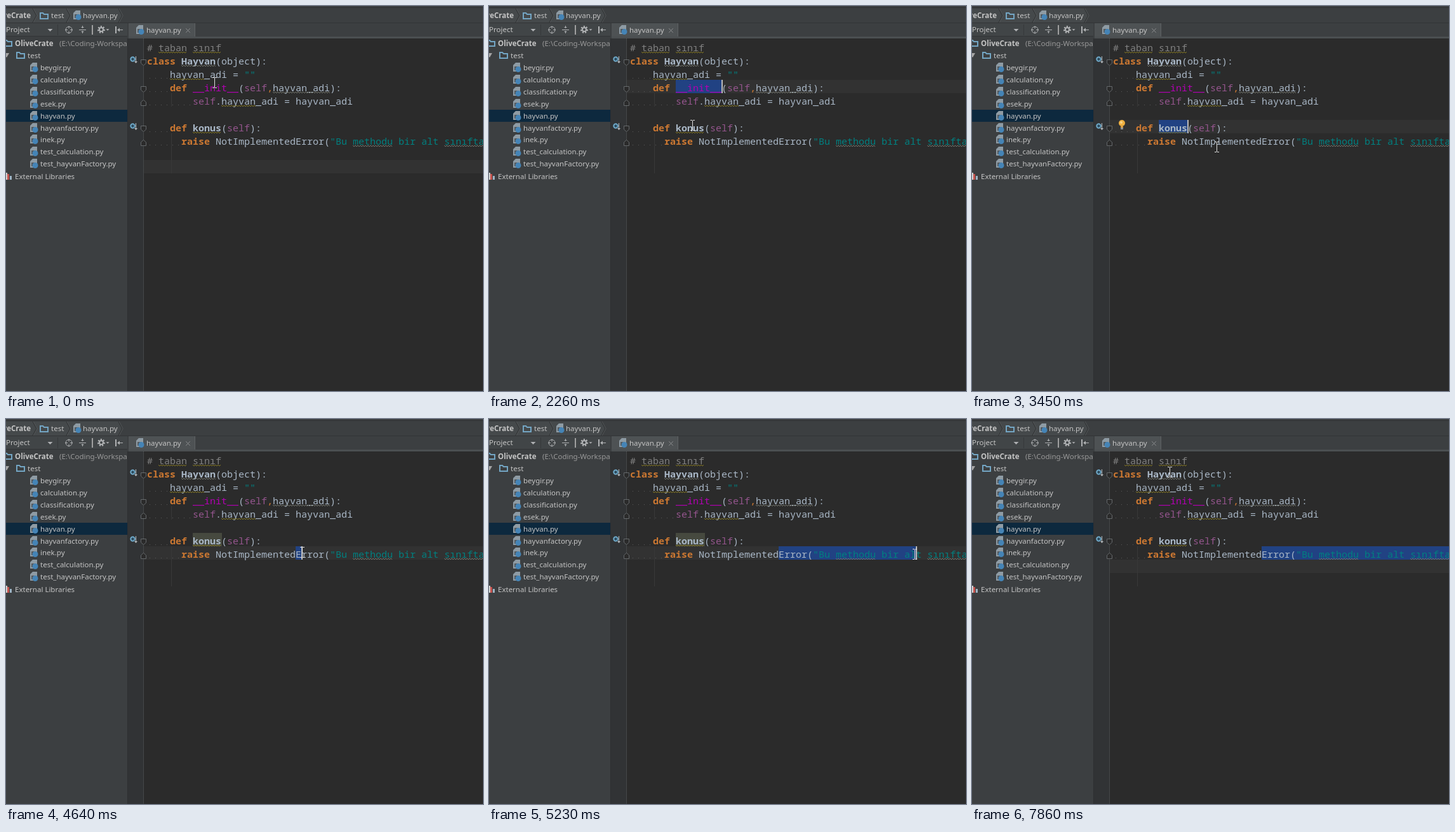
Animation, 751 px wide and 605 px high, one loop 8 s. Source, as an HTML page with a canvas:

```html
<!DOCTYPE html>
<html lang="tr">
<head>
<meta charset="utf-8">
<style>
html, body { margin: 0; height: 100%; overflow: hidden; background: #2b2b2b; }
canvas { display: block; }
</style>
</head>
<body>
<canvas id="stage" width="751" height="605"></canvas>
<script>
const ctx = document.getElementById('stage').getContext('2d');
const LOOP = 8000, STEPS = 54;
const LEFT = 222, TOP = 53, CHAR = 9, LINE = 21;
const UI = '11.5px "Noto Sans", sans-serif', MONO = '15px "Noto Sans Mono", monospace';
const PLAIN = '#a9b7c6', KEY = '#cc7832', SELF = '#94558d', TEXT = '#008080',
      OLIVE = '#857823', GRAY = '#72746c', BLUE = '#73a5c3', LABEL = '#c4c4c4';

const colX = col => LEFT + col * CHAR;
const lineY = row => TOP + row * LINE;

// row, column, text, colour, bold
const code = [
  [0, 0, '# taban sınıf', '#808080'],
  [1, 0, 'class', KEY, 1], [1, 6, 'Hayvan', PLAIN, 1], [1, 12, '(object):', PLAIN],
  [2, 4, 'hayvan_adi =', PLAIN], [2, 17, '""', TEXT],
  [3, 4, 'def', KEY, 1], [3, 8, '__init__', '#b200b2'], [3, 16, '(', PLAIN], [3, 17, 'self', SELF],
  [3, 21, ',', KEY], [3, 22, 'hayvan_adi):', PLAIN],
  [4, 8, 'self', SELF], [4, 12, '.hayvan_adi = hayvan_adi', PLAIN],
  [6, 4, 'def', KEY, 1], [6, 8, 'konus', PLAIN, 1], [6, 13, '(', PLAIN], [6, 14, 'self', SELF], [6, 18, '):', PLAIN],
  [7, 6, 'raise', KEY, 1], [7, 12, 'NotImplementedError(', PLAIN], [7, 32, '"Bu methodu bir alt sınıfta', TEXT]
];
// row, column, length, colour
const waves = [
  [0, 2, 5, OLIVE], [0, 8, 5, OLIVE], [1, 6, 6, GRAY], [2, 4, 6, OLIVE], [3, 22, 10, GRAY],
  [4, 13, 6, OLIVE], [6, 8, 5, OLIVE], [7, 36, 7, GRAY], [7, 52, 7, GRAY]
];
const files = ['beygir', 'calculation', 'classification', 'esek', 'hayvan', 'hayvanfactory',
  'inek', 'test_calculation', 'test_hayvanFactory'];

// step, x, y
const mousePath = [
  [0, 328, 120], [2, 205, 84], [3, 360, 120], [5, 740, 212], [7, 360, 112], [8, 300, 105], [11, 300, 108],
  [12, 335, 128], [13, 335, 130], [15, 320, 187], [18, 318, 191], [20, 535, 212], [22, 400, 222],
  [23, 385, 221], [26, 420, 532], [30, 430, 222], [31, 466, 209], [35, 670, 212], [36, 744, 211],
  [37, 744, 211], [38, 800, 211], [40, 800, 228], [41, 745, 228], [43, 430, 228], [44, 430, 228],
  [45, 360, 130], [46, 306, 43], [49, 300, 38], [50, 382, 12], [52, 210, 40], [53, 311, 83]
];

function rect(x, y, w, h, color) {
  ctx.fillStyle = color;
  ctx.fillRect(x, y, w, h);
}

function write(text, x, y, color = LABEL, font = UI) {
  ctx.font = font;
  ctx.fillStyle = color;
  ctx.fillText(text, x, y);
}

function shape(points, stroke, fill, closed = true) {
  ctx.beginPath();
  points.forEach(([x, y]) => ctx.lineTo(x, y));
  if (closed) ctx.closePath();
  if (fill) { ctx.fillStyle = fill; ctx.fill(); }
  if (stroke) { ctx.strokeStyle = stroke; ctx.stroke(); }
}

function circle(x, y, r, fill, stroke) {
  ctx.beginPath();
  ctx.arc(x, y, r, 0, 7);
  if (fill) { ctx.fillStyle = fill; ctx.fill(); }
  if (stroke) { ctx.strokeStyle = stroke; ctx.stroke(); }
}

function triangleDown(x, y, r) {
  shape([[x - r, y - r / 2], [x + r, y - r / 2], [x, y + r / 2]], null, '#afb1b3');
}

function folder(x, y) {
  ctx.lineWidth = 2;
  shape([[x + 1, y - 4], [x + 5, y - 4], [x + 7, y - 2], [x + 13, y - 2], [x + 13, y + 5], [x + 1, y + 5]], BLUE);
  ctx.lineWidth = 1;
}

function fileIcon(x, y) {
  shape([[x + 4, y - 8], [x + 11, y - 8], [x + 11, y + 6], [x, y + 6], [x, y - 4]], null, '#8e9ba4');
  rect(x + 2, y - 2, 7, 6, '#55595c');
  circle(x + 8, y + 2.5, 4.5, '#4584b6');
}

function breadcrumbs() {
  rect(0, 0, 751, 27, '#3c3f41');
  rect(0, 2, 751, 1, '#2f3133');
  shape([[0, 4], [177, 4], [183, 15], [177, 26], [0, 26]], null, '#45494b');
  rect(0, 26, 751, 1, '#323436');
  ctx.textAlign = 'right';
  write('OliveCrate', 39, 19, LABEL, 'bold ' + UI);
  ctx.textAlign = 'left';
  folder(53, 15);
  write('test', 71, 19);
  fileIcon(106, 15);
  write('hayvan.py', 121, 19);
  for (const x of [42, 95, 177]) {
    shape([[x, 4], [x + 6, 15], [x, 26]], '#292b2c', null, false);
    shape([[x + 1, 4], [x + 7, 15], [x + 1, 26]], '#55585a', null, false);
  }
}

function projectHeader() {
  rect(0, 27, 191, 21, '#414547');
  rect(0, 47, 191, 1, '#323537');
  write('Project', 0, 41);
  triangleDown(69.5, 38, 4);
  rect(81, 29, 1, 17, '#36393b');
  const gray = '#afb1b3';
  circle(99, 37.5, 5, null, gray);
  for (const [dx, dy] of [[0, -1], [0, 1], [-1, 0], [1, 0]])
    rect(98.5 + dx * 4 - (dx ? 1.5 : 0), 37 + dy * 4 - (dy ? 1.5 : 0), dx ? 4 : 1, dy ? 4 : 1, gray);
  rect(115, 37, 11, 1, gray);
  for (const d of [-1, 1]) {
    shape([[118, 37 + d * 4], [123, 37 + d * 4], [120.5, 37 + d * 2]], null, gray);
    rect(120, d < 0 ? 31 : 40, 1, 3, gray);
  }
  rect(135, 30, 2, 15, '#a0a0a0');
  ctx.setLineDash([2, 1.9]);
  ctx.lineWidth = 3;
  circle(150, 37, 4.5, null, gray);
  ctx.setLineDash([]);
  ctx.lineWidth = 2;
  circle(150, 37, 3, null, gray);
  ctx.lineWidth = 1;
  triangleDown(160, 37.5, 2.5);
  rect(172, 32, 2, 11, gray);
  rect(176, 37, 8, 1, gray);
  shape([[175, 37.5], [179, 34.5], [179, 40.5]], null, gray);
}

function tree() {
  ctx.save();
  ctx.beginPath();
  ctx.rect(0, 48, 191, 557);
  ctx.clip();
  rect(0, 48, 191, 557, '#3c3f41');
  rect(0, 163, 191, 19, '#0d293e');
  folder(-4, 58);
  write('OliveCrate', 14, 63, LABEL, 'bold ' + UI);
  write('(E:\\Coding-Workspace)', 84, 63, '#999999');
  shape([[-3, 74], [5, 74], [1, 81]], null, '#a5a5a5');
  folder(16, 77);
  write('test', 34, 82);
  files.forEach((name, i) => {
    const y = 97 + i * 18.9;
    fileIcon(38, Math.round(y));
    write(name + '.py', 54, Math.round(y + 4));
  });
  rect(0, 262, 2, 11, '#d0d0d0');
  rect(2, 264, 3, 9, '#c75450');
  rect(6, 267, 3, 6, '#9fb4c4');
  write('External Libraries', 14, 272);
  ctx.restore();
}

function tabs() {
  rect(191, 27, 560, 24, '#3c3f41');
  rect(193, 27, 105, 22, '#4e5254');
  rect(297, 27, 1, 22, '#5d6163');
  rect(193, 48, 558, 3, '#4b4f51');
  fileIcon(205, 38);
  write('hayvan.py', 221, 42);
  shape([[283.5, 35.5], [289.5, 41.5]], '#8b8d8f');
  shape([[289.5, 35.5], [283.5, 41.5]], '#8b8d8f');
}

function gutter() {
  rect(192, 50, 25, 555, '#313335');
  for (let y = 51; y < 605; y += 2) rect(216, y, 1, 1, '#5a5d5f');
  for (const [y, d] of [[89, 1], [131, 1], [152, -1], [193, 1], [215, -1]])
    shape([[212.5, y - 4.5 * d], [220.5, y - 4.5 * d], [220.5, y + d], [216.5, y + 4.5 * d], [212.5, y + d]],
      '#64686a', '#2b2b2b');
  for (const y of [84, 189]) {
    ctx.lineWidth = 2;
    circle(199.5, y - .5, 3.2, '#2c4a5c', '#6fa9c9');
    ctx.lineWidth = 1;
    rect(204, y - 5, 1, 10, '#b7bcc0');
    shape([[202, y + 3], [207, y + 3], [204.5, y + 6]], null, '#b7bcc0');
  }
}

function wave([row, col, length, color]) {
  const y = lineY(row) + 20, points = [];
  for (let x = colX(col); x <= colX(col + length); x += 2)
    points.push([x, y + ((x - colX(col)) % 4 ? 1 : -1)]);
  shape(points, color, null, false);
}

function codeText() {
  for (const [row, indent] of [[2, 4], [3, 4], [4, 8], [6, 4], [7, 6]])
    for (let i = 0; i < indent; i++) rect(colX(i) + 4, lineY(row) + 18, 1, 1, '#5a5a5a');
  rect(260, 137, 1, 21, '#393939');
  rect(260, 200, 1, 63, '#393939');
  for (const [row, col, text, color, bold] of code)
    write(text, colX(col), lineY(row) + 18, color, (bold ? 'bold ' : '') + MONO);
  waves.forEach(wave);
}

function mouseAt(step) {
  const next = mousePath.findIndex(key => key[0] >= step);
  const b = mousePath[next], a = mousePath[Math.max(0, next - 1)];
  const k = (step - a[0]) / (b[0] - a[0] || 1);
  return [1, 2].map(i => Math.round(a[i] + (b[i] - a[i]) * k));
}

// Current row, selected columns on a row, and caret position
function editState(step, mouseX) {
  if (step < 9) return { row: 9 };
  if (step < 12) return { row: 2, sel: [2, 4, 14], caret: [2, 14] };
  if (step < 18) return { row: 3, sel: [3, 8, 16], caret: [3, 16] };
  if (step < 31) return { row: 6, sel: [6, 8, 13], caret: [6, 13] };
  if (step < 41) {
    const end = Math.round((mouseX - LEFT) / CHAR);
    return { row: 7, sel: [7, 26, end], caret: [7, end] };
  }
  return { row: 8, sel: [7, 26, 60], caret: step < 50 && [8, 0] };
}

function bulb(x, y) {
  circle(x, y - 2, 5, '#f0b040');
  circle(x - 1, y - 3, 2, '#f8d488');
  rect(x - 2, y + 3, 4, 2, '#e0a040');
  rect(x - 2, y + 5, 4, 3, '#8d8f91');
}

function pointer(x, y) {
  if (y < 50) {
    shape([[0, 0], [0, 17], [4, 13], [7, 19.5], [9.5, 18.5], [6.7, 12], [12, 12]]
      .map(([dx, dy]) => [x + dx, y + dy]), '#111', '#fff');
    return;
  }
  const color = '#e0e0e0';
  rect(x, y - 7, 1, 15, color);
  for (const end of [y - 8, y + 8]) {
    rect(x - 3, end, 3, 1, color);
    rect(x + 1, end, 3, 1, color);
  }
}

function draw(now) {
  const step = Math.floor(now % LOOP / LOOP * STEPS);
  const [mouseX, mouseY] = mouseAt(step);
  const { row, sel, caret } = editState(step, mouseX);

  rect(191, 50, 560, 555, '#2b2b2b');
  rect(217, lineY(row), 534, LINE, '#323232');
  if (step >= 31 && step < 50) rect(colX(8), lineY(6), 46, LINE, '#46493f');
  if (sel) rect(colX(sel[1]), lineY(sel[0]), (sel[2] - sel[1]) * CHAR, LINE, '#214283');
  gutter();
  codeText();
  if (caret) rect(colX(caret[1]), lineY(caret[0]), 2, LINE, '#bbbbbb');
  if (step >= 23 && step < 31) bulb(236, 186);
  tree();
  projectHeader();
  rect(191, 27, 1, 578, '#2d2f31');
  tabs();
  breadcrumbs();
  pointer(mouseX, mouseY);
  requestAnimationFrame(draw);
}
requestAnimationFrame(draw);
</script>
</body>
</html>
```
